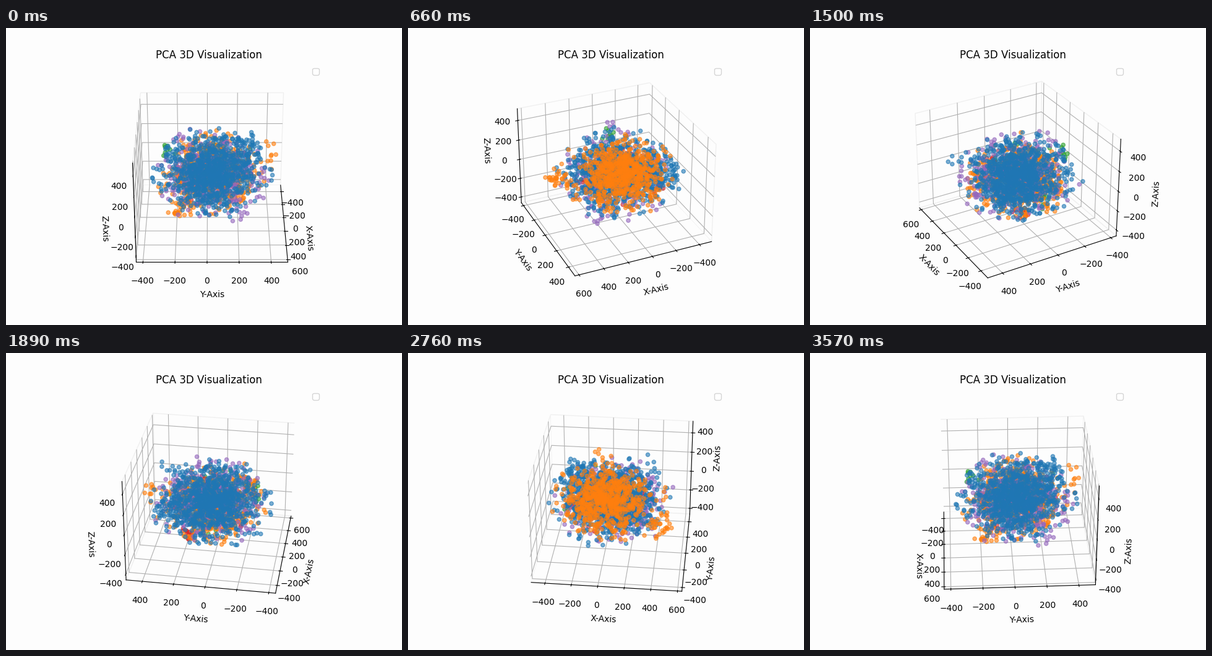
A matplotlib script for the animation above (3600 ms loop, 640 px wide and 480 px high).

```python
import numpy as np
import matplotlib.pyplot as plt
from matplotlib.animation import FuncAnimation

FRAMES = 120
PAPER = "#fdfdfd"
LOW = np.array([-505.0, -442.0, -462.0])
HIGH = np.array([632.5, 504.0, 518.5])
BOX = np.array([1.1905, 1.1905, 0.8929])

rng = np.random.default_rng(11)


def to_data(p):
    """Box units around the cube's centre -> axis values."""
    return (LOW + HIGH) / 2 + p / BOX * (HIGH - LOW)


def ball(n, centre, radius):
    """Flattened ball, dense inside with a sparse rim."""
    d = rng.normal(size=(n, 3))
    d /= np.linalg.norm(d, axis=1, keepdims=True)
    r = radius * rng.beta(2.2, 2.0, size=(n, 1))
    return np.array(centre) + d * r * [1, 1, 0.66]


def clump(n, centre, spread):
    return np.array(centre) + rng.normal(scale=spread, size=(n, 3))


groups = {
    "tab:blue": [
        ball(930, (-0.03, -0.01, 0.0), 0.53),
        clump(40, (-0.36, 0.26, 0.08), 0.06),
        clump(4, (0.30, 0.44, 0.13), 0.03),
    ],
    "tab:orange": [
        ball(440, (-0.10, 0.01, 0.0), 0.45),
        ball(190, (-0.02, 0.0, 0.0), 0.53),
        clump(30, (0.39, -0.25, -0.055), 0.045),
        clump(9, (-0.12, 0.44, 0.13), 0.05),
    ],
    "tab:green": [
        ball(50, (-0.05, 0.0, 0.0), 0.42),
        clump(8, (-0.12, -0.36, 0.15), 0.03),
        clump(12, (-0.36, -0.03, -0.06), 0.03),
    ],
    "tab:red": [
        ball(60, (-0.03, 0.0, -0.02), 0.42),
        clump(12, (-0.33, 0.16, -0.14), 0.03),
        clump(10, (0.23, 0.08, 0.0), 0.03),
    ],
    "tab:purple": [
        ball(360, (0.0, 0.0, 0.0), 0.54),
        clump(5, (-0.11, -0.27, 0.30), 0.05),
        clump(6, (0.22, 0.22, -0.23), 0.03),
    ],
}

fig = plt.figure(figsize=(6.4, 4.8), dpi=100, facecolor=PAPER)
ax = fig.add_subplot(111, projection="3d", computed_zorder=False)
ax.set_facecolor(PAPER)
ax.set_title("PCA 3D Visualization")

clouds = {}
for colour, parts in groups.items():
    pts = to_data(np.vstack(parts))
    clouds[colour] = ax.scatter(*pts.T, color=colour, alpha=0.6)

ax.set(xlim=(LOW[0], HIGH[0]), ylim=(LOW[1], HIGH[1]), zlim=(LOW[2], HIGH[2]),
       xlabel="X-Axis", ylabel="Y-Axis", zlabel="Z-Axis")
for axis in (ax.xaxis, ax.yaxis, ax.zaxis):
    axis.set_pane_color(PAPER)
    axis.pane.set_edgecolor("#f0f0f0")
ax.legend(handles=[], labels=[])

BLUE_FRONT = ["tab:green", "tab:red", "tab:orange", "tab:purple", "tab:blue"]
ORANGE_FRONT = ["tab:green", "tab:red", "tab:purple", "tab:blue", "tab:orange"]


def update(i):
    azim = i * 360 / FRAMES
    # the colour reaching closest to the viewer is painted last
    orange = 42 <= azim < 135 or 190 <= azim < 312
    for z, colour in enumerate(ORANGE_FRONT if orange else BLUE_FRONT):
        clouds[colour].set_zorder(1 + z / 10)
    ax.view_init(elev=30, azim=azim)
    return []


anim = FuncAnimation(fig, update, frames=FRAMES, interval=30,
                     init_func=lambda: [], repeat=True, repeat_delay=0)
plt.show()
```
